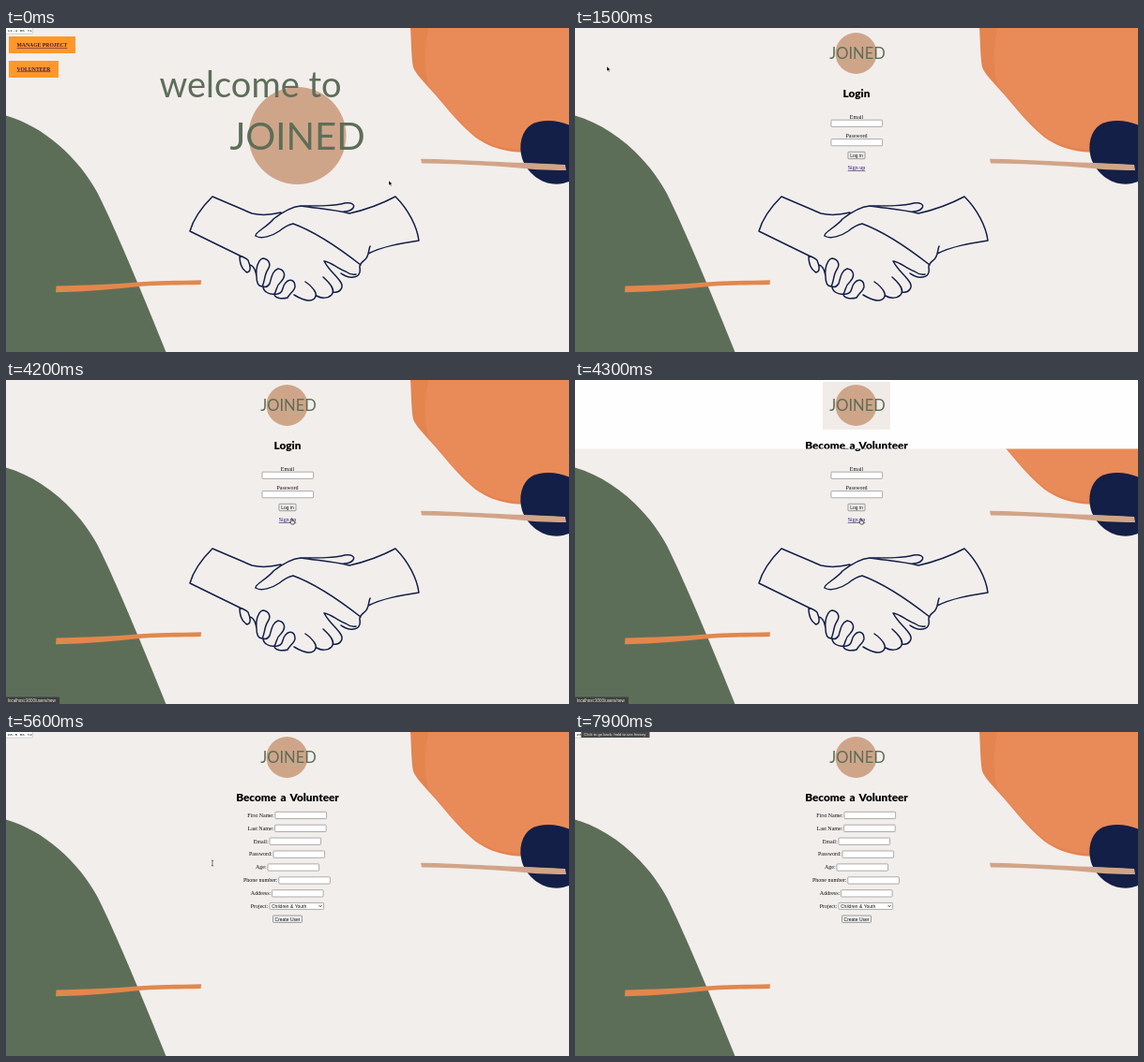
These frames come from a looping animation (600x346 px, 8000 ms). An HTML page:

```html
<!DOCTYPE html>
<html lang="en">
<head>
<meta charset="utf-8">
<title>Volunteer sign-up</title>
<style>
html, body { margin: 0; width: 100%; height: 100%; overflow: hidden; background: #f2eeec; }
svg { display: block; width: 100%; height: 100%; }
text { font: 6px "Liberation Serif", "Times New Roman", serif; fill: #111; }
.mid { text-anchor: middle; }
.end { text-anchor: end; }
.brand { font-family: Lato, sans-serif; fill: #5d6e58; text-anchor: middle; }
.head { font: 900 11.8px "Comic Sans MS", Lato, sans-serif; fill: #000; text-anchor: middle; word-spacing: 1.6px; }
.ui { font: 5px "Liberation Sans", Arial, sans-serif; }
.tiny { font: 4.5px "Liberation Sans", Arial, sans-serif; fill: #eee; }
.mono { font: 4.4px "Liberation Mono", monospace; fill: #111; }
.link { font-weight: bold; font-size: 5.7px; fill: #3c1745; text-decoration: underline; }
.sign { fill: #2a1468; text-decoration: underline; text-anchor: middle; }
.field { fill: #fff; stroke: #8c8c8c; stroke-width: .7; }
.btn { fill: #efefef; stroke: #777; stroke-width: .7; }
.line { fill: none; stroke: #131f47; stroke-width: 1.5; stroke-linecap: round; stroke-linejoin: round; }
</style>
</head>
<body>
<svg id="stage" viewBox="0 0 600 346" preserveAspectRatio="none"></svg>
<script>
const LOOP = 8000, STEP = 100, NAME = 'JOINED';

const text = (x, y, str, cls, size) =>
  `<text x="${x}" y="${y}" class="${cls}"${size ? ` style="font-size:${size}px"` : ''}>${str}</text>`;
const box = (x, y, w, h, cls) => `<rect x="${x}" y="${y}" width="${w}" height="${h}" rx=".8" class="${cls}"/>`;
const fill = (x, y, w, h, color) => `<rect x="${x}" y="${y}" width="${w}" height="${h}" fill="${color}"/>`;
const shape = (color, d) => `<path fill="${color}" d="${d}"/>`;
const group = (id, body) => `<g id="${id}">${body}</g>`;
const label = (x, y, str) => text(x, y, str, 'end');

const backdrop = fill(0, 0, 600, 346, '#f2eeec')
  + shape('#5d6e58', 'M0 93.5C40 105 77 138 98 177C117 215 147 288 170.5 346H0Z')
  + shape('#e4844f', 'M431 0C432 16 432 32 434 42C437 50 447 59 459 73C470 86 482 101 497 114C511 126 532 133 553 132.5L600 120V0Z')
  + shape('#e98b58', 'M450 0C446 20 445 42 450 61L460 73C471 86 483 101 498 113C512 124 532 130 553 129.5L600 120V0Z')
  + shape('#131f47', 'M600 103.5C588 98 570 97 560 103C549 110 546 126 550 139C554 152 567 165 583 166.5C589 167 595 166 600 164Z')
  + shape('#d2a488', 'M442 139.7C470 140 500 142 535 143.4C560 144 580 145 596 146L597 152C575 152 560 151 535 148.5C505 146 475 145 443 144.4Z')
  + shape('#e2874c', 'M53.5 275.5C85 274.5 115 274 140 271.5C160 270 185 270 208 269.3L207.6 274C185 274.5 165 274.5 145 275.7C115 279 85 281.5 53 282.2Z');

const hands = '<path class="line" d="' + [
  'M266 222C265 218 278 213 285 204C294 197 304 191 314 190C335 193 350 194 366 198C384 194 400 188 415 180C429 194 438 212 440 227C421 230 402 233 386 241',
  'M266 222C272 226 284 222 291 217C296 213 301 210 306 209C328 217 355 235 378 253',
  'M293 197C281 200 270 200 262 198L220 180C207 193 199 206 196 217L249 243',
  'M314 190C335 190 350 190 361 187C369 186 372 189 370 192C368 195 364 196 360 196',
  'M388 233C386 238 387 243 383 247C380 250 376 252 377 256C378 261 376 266 370 266C364 267 360 264 357 262',
  'M249 243C249 250 251 258 257 261C262 260 260 253 258 248C255 245 252 244 249 243',
  'M260 253C264 254 266 259 267 265C266 256 269 247 274 246C280 247 283 252 279 258C275 264 276 271 273 276C269 276 267 272 267 265',
  'M274 276C274 281 280 285 286 284C289 280 287 276 293 271C299 265 297 258 290 257C284 259 283 266 281 273C279 276 276 277 274 276',
  'M286 284C286 288 293 290 300 288C303 283 308 280 308 276C308 269 302 267 298 272C294 276 296 281 292 283C290 284 288 285 286 284',
  'M307 285C312 288 317 291 323 291C329 291 332 286 329 281C326 276 322 273 319 271',
  'M331 286C336 289 343 289 347 285C351 280 347 274 338 266',
  'M349 282C356 283 360 277 357 272C353 265 345 260 339 249C347 250 353 257 362 260C366 263 369 264 373 263'
].join('') + '"/>';

const mark = '<circle cx="299.5" cy="27" r="22" fill="#cfa58a"/>' + text(301, 33, NAME, 'brand', 16.5);
const title = text(300, 74, 'Become a Volunteer', 'head');

const home = '<circle cx="310.5" cy="115" r="52" fill="#cfa58a"/>'
  + text(260.5, 74, 'welcome to', 'brand', 38) + text(310.5, 130, NAME, 'brand', 40)
  + fill(3, 9, 71, 18, '#ff982b') + fill(3, 35, 53, 18, '#ff982b')
  + text(11.5, 20, 'MANAGE PROJECT', 'link') + text(11.5, 45.5, 'VOLUNTEER', 'link');

const login = mark + text(300, 74, 'Login', 'head')
  + text(300, 97, 'Email', 'mid') + box(273, 98.2, 54.6, 7.2, 'field')
  + text(300, 117, 'Password', 'mid') + box(273, 118.6, 54.6, 7.2, 'field')
  + box(291, 132.3, 18, 7.4, 'btn') + text(300, 137.8, 'Log in', 'ui mid')
  + text(300, 151, 'Sign up', 'sign');

const rows = [['First Name:', 287], ['Last Name:', 286.6], ['Email:', 281], ['Password:', 285],
  ['Age:', 279], ['Phone number:', 290.8], ['Address:', 283.5]];
const signup = mark + title
  + rows.map(([name, x], i) => {
    const y = 89 + i * 13.9;
    return label(x - 1.3, y + 1.7, name) + box(x, y - 3.7, 54.6, 7.3, 'field');
  }).join('')
  + label(279.3, 188, 'Project:') + box(281, 182.4, 57.6, 7, 'field')
  + text(283, 187.7, 'Children &amp; Youth', 'ui')
  + '<path d="M333.6 185l1.5 1.7l1.5-1.7" fill="none" stroke="#222" stroke-width=".8"/>'
  + box(284.5, 196, 31, 7.4, 'btn') + text(300, 201.5, 'Create User', 'ui mid');

// half-painted page while the form loads
const loading = '<g clip-path="url(#top)">' + fill(0, 0, 600, 74, '#fefefe')
  + fill(264, 2, 72, 51, '#f1ebe8') + mark + title + '</g>';

const pointers = {
  arrow: '<path d="M0 0V5L1.2 4L2.1 5.8L2.9 5.4L2.1 3.7L3.6 3.6Z" fill="#000" stroke="#fff" stroke-width=".35"/>',
  hand: '<path d="M0 0Q.8-.8 1 .4V2.2L3.4 2.8Q4 3.2 3.6 4.4L3 6H.3L-1.4 3.6Q-1.2 2.8-.1 3.6Z" fill="#fff" stroke="#111" stroke-width=".7"/>',
  beam: '<path d="M-1.2-3Q0-3 0-2.2Q0-3 1.2-3M0-2.2V2.2M-1.2 3Q0 3 0 2.2Q0 3 1.2 3" fill="none" stroke="#222" stroke-width=".6"/>'
};

const stage = document.getElementById('stage');
stage.innerHTML = '<clipPath id="top"><rect width="600" height="73.5"/></clipPath>' + backdrop
  + group('hands', hands) + group('home', home) + group('login', login) + group('signup', signup)
  + group('loading', loading)
  + group('badge', '<rect x="-2" y="-2" width="30.5" height="8" rx="1" fill="#fff" stroke="#bbb" stroke-width=".6"/>'
    + text(1.5, 4, '', 'mono'))
  + group('status', '<rect id="bar" x="-1" y="338.5" height="9" rx="1" fill="#3d3f3e"/>' + text(2, 344, '', 'tiny'))
  + group('tip', fill(6.5, 0, 73, 6, '#474747') + text(9.5, 4.3, 'Click to go back, hold to see history', 'tiny', 4.2))
  + group('pointer', Object.entries(pointers).map(([id, body]) => group(id, body)).join(''));
const $ = id => document.getElementById(id);

// each entry holds from its time until the next one
const pages = [[0, 'home'], [1500, 'login'], [4400, 'signup']];
const badges = [[0, '11.4 ms ×1'], [1500, ''], [1700, '16.9 ms ×2'], [4100, ''], [4800, '20.5 ms ×2']];
const links = [[0, ''], [1400, 'localhost:3000/login'], [1500, ''], [3500, 'localhost:3000/users/new'], [4700, '']];
const kinds = [[0, 'arrow'], [1200, 'hand'], [1500, 'arrow'], [3400, 'hand'], [4500, 'beam'], [5700, 'arrow'], [6000, '']];
const path = [[0, 408, 163], [400, 408, 163], [700, 255, 112], [1000, 40, 52], [1100, 11, 46], [1300, 34, 41],
  [1500, 34, 41], [1700, 37, 41], [1900, 37, 41], [2100, 90, 44], [2400, 262, 42], [2600, 303, 95],
  [2800, 307, 147], [2900, 309, 150], [3100, 306.5, 146], [3400, 303, 150], [3600, 304, 148],
  [4500, 304, 148], [4900, 302, 120], [5000, 300, 100], [5200, 312, 185], [5400, 290, 172],
  [5500, 290, 172], [5600, 220, 140], [5800, 95, 55], [5900, 30, 3], [8000, 30, 3]];

const held = (list, t) => list.filter(k => k[0] <= t).pop()[1];
const show = (id, on) => { $(id).style.display = on ? '' : 'none'; };
const between = (t, a, b) => t >= a && t < b;

function place(t) {
  const i = path.findIndex(p => p[0] > t);
  const [t0, x0, y0] = path[i - 1], [t1, x1, y1] = path[i];
  const k = (t - t0) / (t1 - t0);
  return [x0 + (x1 - x0) * k, y0 + (y1 - y0) * k];
}

function draw(t) {
  const page = held(pages, t), badge = held(badges, t), link = held(links, t), kind = held(kinds, t);
  for (const [, id] of pages) show(id, id === page);
  show('hands', page !== 'signup');
  show('loading', between(t, 4300, 4400));
  show('tip', t >= 7900);
  show('badge', badge);
  $('badge').lastChild.textContent = badge;
  show('status', link);
  $('status').lastChild.textContent = link;
  $('bar').setAttribute('width', 6 + link.length * 2.17);
  for (const id in pointers) show(id, id === kind);
  $('pointer').setAttribute('transform', `translate(${place(t)})`);
}

const start = performance.now();
function tick() {
  const t = (performance.now() - start) % LOOP;
  draw(Math.floor(t / STEP) * STEP);
  requestAnimationFrame(tick);
}
tick();
</script>
</body>
</html>
```
